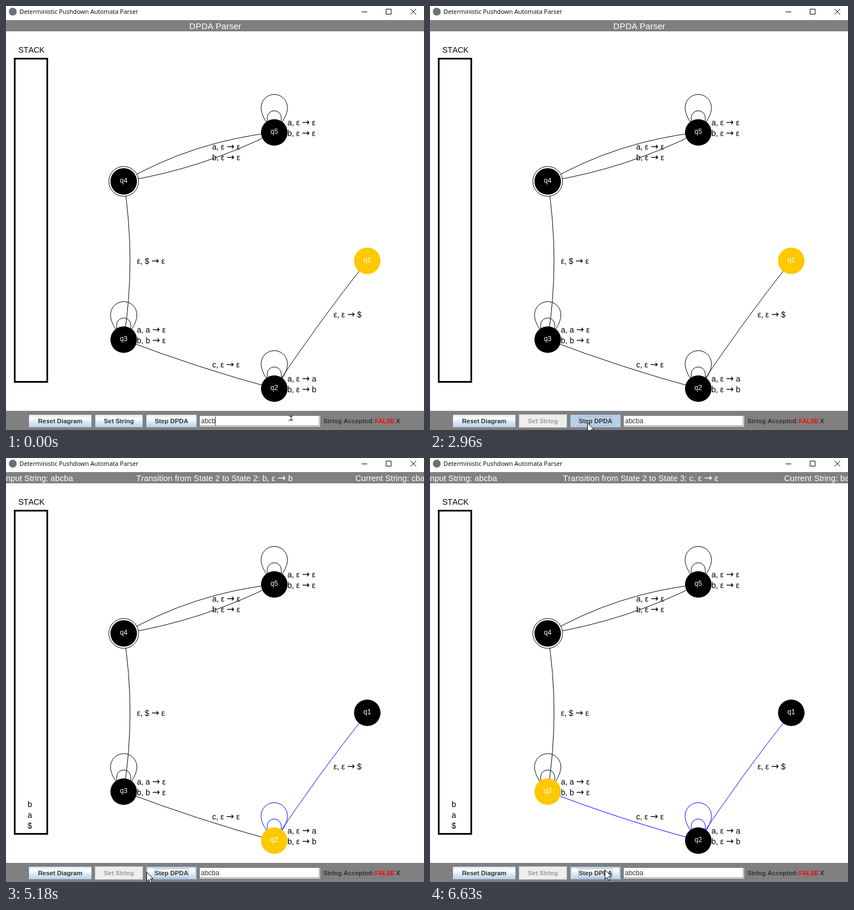
An HTML page for the animation above (7990 ms loop, 744 px wide and 753 px high).

```html
<!DOCTYPE html>
<html lang="en">
<head>
<meta charset="utf-8">
<title>DPDA Parser</title>
<style>
html, body { margin: 0; width: 100%; height: 100%; overflow: hidden; background: #fff; }
svg { display: block; width: 744px; height: 753px; }
text { font: 14px "Liberation Sans", Arial, sans-serif; font-kerning: none; white-space: pre; }
.arrow { font-family: "DejaVu Sans", sans-serif; font-size: 1.19em; }
.crisp { shape-rendering: crispEdges; }
.line { fill: none; stroke: #000; }
.line.used { stroke: #00f; }
.win { font: 10.85px "Open Sans", sans-serif; }
.head { font-size: 14.75px; fill: #fff; }
.mid { text-anchor: middle; }
.state { font-size: 12px; fill: #fff; text-anchor: middle; }
.bold { font-size: 11.3px; font-weight: bold; fill: #333; }
</style>
</head>
<body>
<svg id="stage" viewBox="0 0 744 753">
  <defs>
    <linearGradient id="metal" x2="0" y2="1">
      <stop offset="0" stop-color="#dde8f3"/>
      <stop offset=".3" stop-color="#fff"/>
      <stop offset=".6" stop-color="#dde8f3"/>
      <stop offset="1" stop-color="#b8cfe5"/>
    </linearGradient>
  </defs>
</svg>
<script>
const LOOP = 7990;
const stage = document.getElementById('stage');

function add(tag, attrs, parent = stage) {
  const el = document.createElementNS('http://www.w3.org/2000/svg', tag);
  for (const key in attrs) el.setAttribute(key, attrs[key]);
  return parent.appendChild(el);
}
// Arrows get their own, wider glyph
function write(el, content) {
  if (el.textContent === content) return;
  el.textContent = '';
  for (const part of content.split(/(→)/)) {
    add('tspan', part === '→' ? { class: 'arrow' } : {}, el).textContent = part;
  }
}
function text(x, y, content, cls = '') {
  const el = add('text', { x, y, class: cls });
  write(el, content);
  return el;
}
const rect = (x, y, width, height, attrs) => add('rect', { x, y, width, height, class: 'crisp', ...attrs });
const line = d => add('path', { d, class: 'line' });
const show = (el, on) => el.setAttribute('visibility', on ? 'visible' : 'hidden');

// Window frame
rect(0, 0, 744, 753, { fill: '#fff' });
add('circle', { cx: 12, cy: 10, r: 7, fill: '#6b6f78' });
text(24, 14, 'Deterministic Pushdown Automata Parser', 'win');
line('M633 10.5H643M676.5 5.5h9v9h-9z');
line('M720 5L730 15M730 5L720 15');
rect(0, 25, 744, 20, { fill: '#808080' });
const title = text(372.5, 41, '', 'head mid');
const input = text(119.5, 41, 'Input String: abcba', 'head');
input.setAttribute('text-anchor', 'end');
const rest = text(605, 41, '', 'head');

// Stack
text(22, 83, 'STACK');
rect(15.5, 93.5, 58, 574, { fill: 'none', stroke: '#000', 'stroke-width': 3 });
const stack = [0, 1, 2].map(i => text(42.5, 657.5 - i * 18.7, '', 'mid'));

// Graph
const nodes = {
  q1: [643, 452.5], q2: [477.5, 679.5], q3: [209.5, 592.5], q4: [209.5, 311.5], q5: [477.5, 224.5]
};

const edge = (from, to, cx, cy) => line(`M${nodes[from]}Q${cx} ${cy} ${nodes[to]}`);
function loops(name) {
  const [x, y] = nodes[name];
  return [
    line(`M${x - 12.5} ${y - 18}V${y - 26}a12.5 12.5 0 0 1 25 0V${y - 18}`),
    line(`M${x - 14} ${y - 18}C${x - 20} ${y - 28} ${x - 23.5} ${y - 36} ${x - 23.5} ${y - 44}` +
      `a23.5 23.5 0 0 1 47 0C${x + 23.5} ${y - 36} ${x + 20} ${y - 28} ${x + 14} ${y - 18}`)
  ];
}
edge('q4', 'q5', 334, 240);
edge('q4', 'q5', 350, 289);
edge('q4', 'q3', 232, 452);
const popEdge = edge('q3', 'q2', 342, 643);
const startEdge = edge('q1', 'q2', 555.5, 562.5);
loops('q5');
loops('q3');
const [loopA, loopB] = loops('q2');
const path = [startEdge, loopA, loopB, popEdge];

const discs = {};
for (const name in nodes) {
  const [cx, cy] = nodes[name];
  if (name === 'q4') add('circle', { cx, cy, r: 26.5, fill: '#fff', stroke: '#000' });
  discs[name] = add('circle', { cx, cy, r: 23.6 });
  text(cx, cy + 2.5, name, 'state');
}

const EPS = 'ε → ε';
[
  [501, 212, 'a, ' + EPS, 'b, ' + EPS],
  [367, 255, 'a, ' + EPS, 'b, ' + EPS],
  [233, 458, 'ε, $ → ε'],
  [233, 580, 'a, a → ε', 'b, b → ε'],
  [367, 642, 'c, ' + EPS],
  [501, 667, 'a, ε → a', 'b, ε → b'],
  [583, 553, 'ε, ε → $']
].forEach(([x, y, ...rows]) => rows.forEach((row, i) => text(x, y + 19 * i, row)));

// Toolbar
rect(0, 719, 744, 34, { fill: '#808080' });

function button(x, w, label) {
  const face = rect(x + .5, 725.5, w - 1, 23, { stroke: '#7a8a99' });
  const glow = rect(x + 2, 727, w - 4, 20, { fill: 'none', stroke: '#b8cfe5', 'stroke-width': 2 });
  const caption = text(x + w / 2, 741, label, 'bold mid');
  return (state, hover) => {
    const off = state === 'off';
    face.setAttribute('fill', off ? '#eee' : state === 'down' ? '#b8cfe5' : 'url(#metal)');
    face.setAttribute('stroke', off ? '#b8b8b8' : '#7a8a99');
    caption.style.fill = off ? '#999' : '#333';
    show(glow, hover && !off);
  };
}
button(40, 113, 'Reset Diagram')('up', false);
const setButton = button(158, 86, 'Set String');
const stepButton = button(249, 91, 'Step DPDA');
const focus = rect(264.5, 729.5, 60, 16, { fill: 'none', stroke: '#a3b8cc' });

rect(345.5, 728.5, 213, 18, { fill: '#fff', stroke: '#fff' });
rect(344.5, 727.5, 213, 18, { fill: 'none', stroke: '#7a8a99' });
const field = text(347, 741, '');
field.style.fontSize = '12px';
field.style.fill = '#333';
const caret = rect(0, 729, 1, 16, { fill: '#333' });
text(565, 741, 'String Accepted:', 'bold');
const verdict = text(656.5, 741, 'FALSE', 'bold');
verdict.style.fontSize = '10.7px';
verdict.style.fill = '#f00';
text(694, 741, 'X', 'bold');

const beam = line('M504 728.5h6M507.5 728V735M503 735.5h8');
const pointer = add('path', {
  d: 'M.5 .5V17L4.3 13.4L7 19.2L9.6 18L7 12.2H12.2Z', fill: '#fff', stroke: '#000'
});

// Machine states: start time, active node, stack, remaining string, transition
const steps = [
  [0, 'q1', '', '', ''],
  [3070, 'q2', '$', 'abcba', '1 to State 2: ε, ε → $'],
  [3570, 'q2', '$a', 'bcba', '2 to State 2: a, ε → a'],
  [4560, 'q2', '$ab', 'cba', '2 to State 2: b, ε → b'],
  [6630, 'q3', '$ab', 'ba', '2 to State 3: c, ε → ε']
];

// Pointer: time, x, y
const moves = [
  [860, 228, 741], [1230, 243, 741], [1350, 268, 741], [1470, 280, 740],
  [5180, 250, 735], [5300, 200, 700], [5420, 137, 652], [5540, 75, 600],
  [5660, 25, 560], [5780, 1, 537], [5900, 22, 553],
  [6030, 52, 572], [6150, 122, 624], [6270, 210, 686], [6390, 291, 727], [6510, 311, 731]
];
const within = (t, a, b) => t >= a && t < b;
const latest = (list, t) => list.filter(item => item[0] <= t).pop();

function draw(t) {
  const step = latest(steps, t);
  const n = steps.indexOf(step);
  const [, active, symbols, remaining, rule] = step;

  write(title, n ? 'Transition from State ' + rule : 'DPDA Parser');
  title.setAttribute('x', n ? 359.3 + 3.9 * n : 372.5);
  title.style.fontSize = n ? '' : '15.4px';
  show(input, n);
  write(rest, n ? 'Current String: ' + remaining : '');
  rest.setAttribute('x', 596.2 + 8.5 * n);
  stack.forEach((el, i) => write(el, symbols[i] || ''));
  path.forEach((el, i) => el.classList.toggle('used', i < n));
  for (const name in discs) discs[name].setAttribute('fill', name === active ? '#ffc800' : '#000');

  write(field, t < 120 ? 'abcb' : 'abcba');
  caret.setAttribute('x', t < 120 ? 372 : 379);
  show(caret, t < 620);
  show(beam, t < 620);

  const move = latest(moves, t);
  const [, x, y] = move || [0, -50, -50];
  show(pointer, move);
  pointer.setAttribute('transform', `translate(${x} ${y})`);
  const over = (left, right) => within(x, left, right) && within(y, 725, 749);
  const pressed = within(t, 2960, 3070) || within(t, 4450, 4560) || within(t, 6510, 6630);
  setButton(t >= 1110 ? 'off' : t >= 980 ? 'down' : 'up', over(158, 244));
  stepButton(pressed ? 'down' : 'up', over(249, 340) && !pressed);
  show(focus, t >= 1110);
}

const begin = performance.now();
function tick() {
  draw((performance.now() - begin) % LOOP);
  requestAnimationFrame(tick);
}
tick();
</script>
</body>
</html>
```
